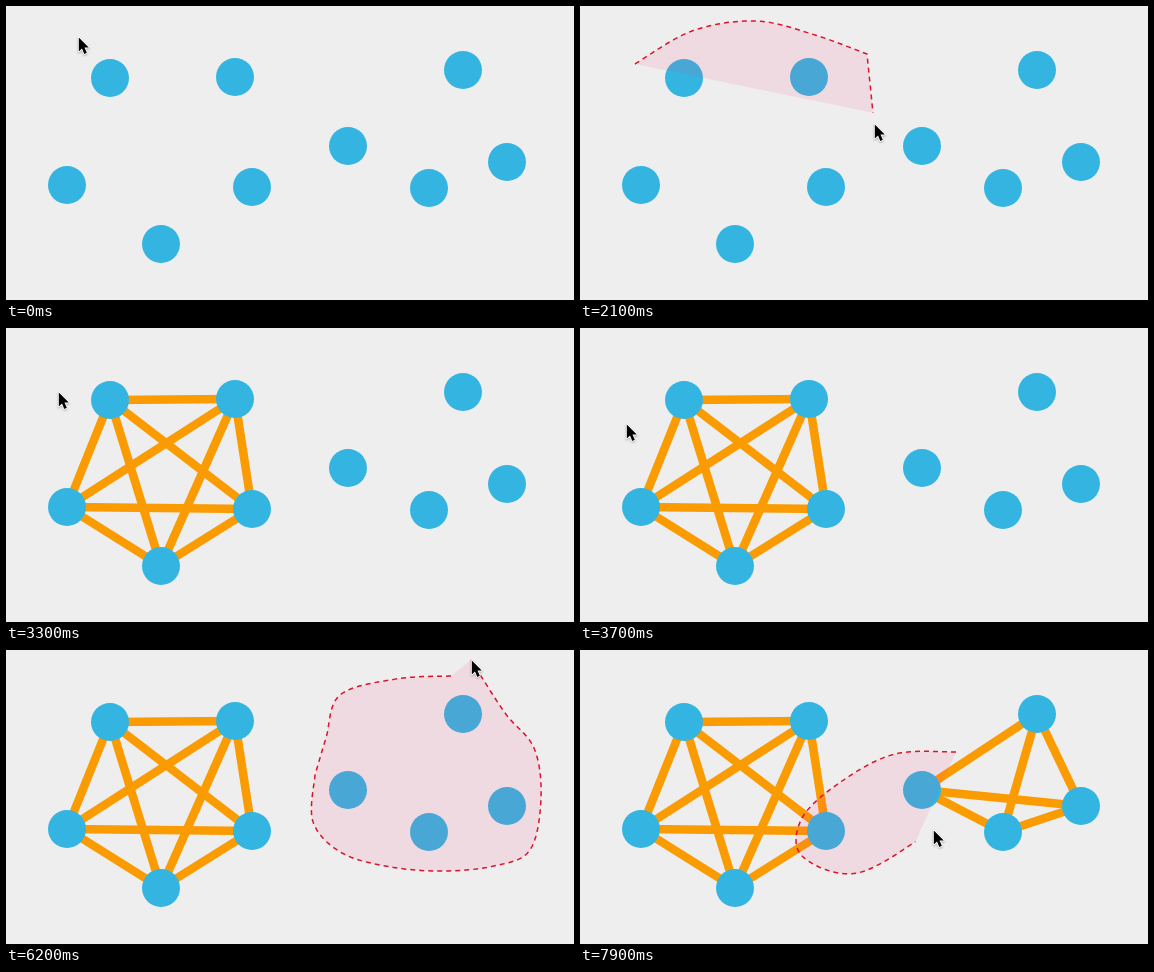
An HTML page with a canvas for the animation above (8 s loop, 568 by 294 pixels).

```html
<!DOCTYPE html>
<html lang="en">
<head>
<meta charset="utf-8">
<title>Lasso linking</title>
<style>
  html, body { margin: 0; width: 100%; height: 100%; overflow: hidden; background: #eee; }
  canvas { display: block; }
</style>
</head>
<body>
<canvas id="stage" width="568" height="294"></canvas>
<script>
const ctx = document.getElementById('stage').getContext('2d');
const LOOP = 8000, STEP = 100;
const LAG = 30; // the drawn line trails the pointer by this many ms

// Each group becomes fully linked at its time.
const groups = [
  { linkAt: 3300, dots: [[104, 72], [229, 71], [246, 181], [155, 238], [61, 179]] },
  { linkAt: 6400, dots: [[457, 64], [342, 140], [423, 182], [501, 156]] }
];

// Pointer route: smooth legs through evenly timed key points; it rests between legs.
const legs = [
  { from: 0, to: 300, pts: [[72, 31], [110, 11], [160, 3]] },
  { from: 400, to: 800, pts: [[160, 3], [55, 58]] },
  { from: 900, to: 1800, pts: [[55, 58], [112, 25], [175, 15], [232, 28], [287, 48]] },
  { from: 1900, to: 2700, pts: [[287, 48], [294, 118], [300, 188], [250, 247], [160, 269]] },
  { from: 2700, to: 3300, pts: [[160, 269], [75, 240], [30, 150], [52, 64]] },
  { from: 3300, to: 3700, pts: [[52, 64], [46, 96]] },
  { from: 3700, to: 4700, pts: [[46, 96], [250, 95], [445, 26]] },
  { from: 4700, to: 5200, pts: [[445, 26], [390, 29], [334, 45], [320, 88], [309, 125]] },
  { from: 5200, to: 6150, pts: [[309, 125], [307, 172], [336, 203], [385, 217], [437, 221],
    [488, 216], [524, 200], [535, 148], [528, 98], [499, 63], [465, 10]] },
  { from: 6400, to: 7200, pts: [[465, 10], [376, 102]] },
  { from: 7300, to: 7900, pts: [[376, 102], [315, 104], [262, 131], [222, 168], [222, 206],
    [278, 223], [353, 180]] }
];

// Spans of time in which the pointer draws a lasso.
const lassos = [[900, 3300], [4700, 6400], [7300, LOOP]];

// Catmull-Rom spline through pts, u from 0 to 1.
function spline(pts, u) {
  const last = pts.length - 1;
  const i = Math.min(Math.floor(u * last), last - 1), f = u * last - i;
  const at = k => pts[Math.max(0, Math.min(last, k))];
  return [0, 1].map(c => {
    const a = at(i)[c], b = at(i + 1)[c];
    const m = (b - at(i - 1)[c]) / 2, n = (at(i + 2)[c] - a) / 2;
    return a + f * (m + f * (3 * (b - a) - 2 * m - n + f * (2 * (a - b) + m + n)));
  });
}

function pointer(t) {
  const leg = legs.filter(l => l.from <= t).pop();
  return spline(leg.pts, Math.min(1, (t - leg.from) / (leg.to - leg.from)));
}

function trace(pts) {
  ctx.beginPath();
  pts.forEach(([x, y]) => ctx.lineTo(x, y));
}

function drawGroup({ linkAt, dots }, t) {
  if (t >= linkAt) {
    ctx.strokeStyle = '#fa9b02';
    ctx.lineWidth = 8.5;
    dots.forEach((a, i) => dots.slice(i + 1).forEach(b => {
      trace([a, b]);
      ctx.stroke();
    }));
  }
  ctx.fillStyle = '#34b5e1';
  for (const [x, y] of dots) {
    ctx.beginPath();
    ctx.arc(x, y, 19, 0, 2 * Math.PI);
    ctx.fill();
  }
}

function drawLasso(from, t) {
  const end = t - LAG, pts = [];
  if (end <= from) return;
  for (let s = from; s < end; s += 10) pts.push(pointer(s));
  trace([...pts, pointer(end)]);
  ctx.fillStyle = 'rgba(250, 40, 120, 0.1)';
  ctx.fill();
  ctx.strokeStyle = '#d9152a';
  ctx.lineWidth = 1.5;
  ctx.setLineDash([5, 4]);
  ctx.stroke();
  ctx.setLineDash([]);
}

function drawPointer([x, y]) {
  ctx.save();
  ctx.translate(x + 0.8, y + 0.5);
  trace([[0, 0], [0, 14], [3.2, 11], [5.5, 16.4], [8, 15.3], [5.7, 10], [10, 10]]);
  ctx.closePath();
  ctx.shadowColor = 'rgba(0, 0, 0, 0.3)';
  ctx.shadowBlur = 2;
  ctx.shadowOffsetY = 1;
  ctx.strokeStyle = '#fff';
  ctx.lineWidth = 1.8;
  ctx.lineJoin = 'round';
  ctx.stroke();
  ctx.shadowColor = 'transparent';
  ctx.fillStyle = '#000';
  ctx.fill();
  ctx.restore();
}

function draw(t) {
  ctx.fillStyle = '#eee';
  ctx.fillRect(0, 0, 568, 294);
  groups.forEach(g => drawGroup(g, t));
  const active = lassos.find(([from, to]) => t >= from && t < to);
  if (active) drawLasso(active[0], t);
  drawPointer(pointer(t));
}

const start = performance.now();
function tick() {
  const t = (performance.now() - start) % LOOP;
  draw(Math.floor(t / STEP) * STEP);
  requestAnimationFrame(tick);
}
tick();
</script>
</body>
</html>
```
